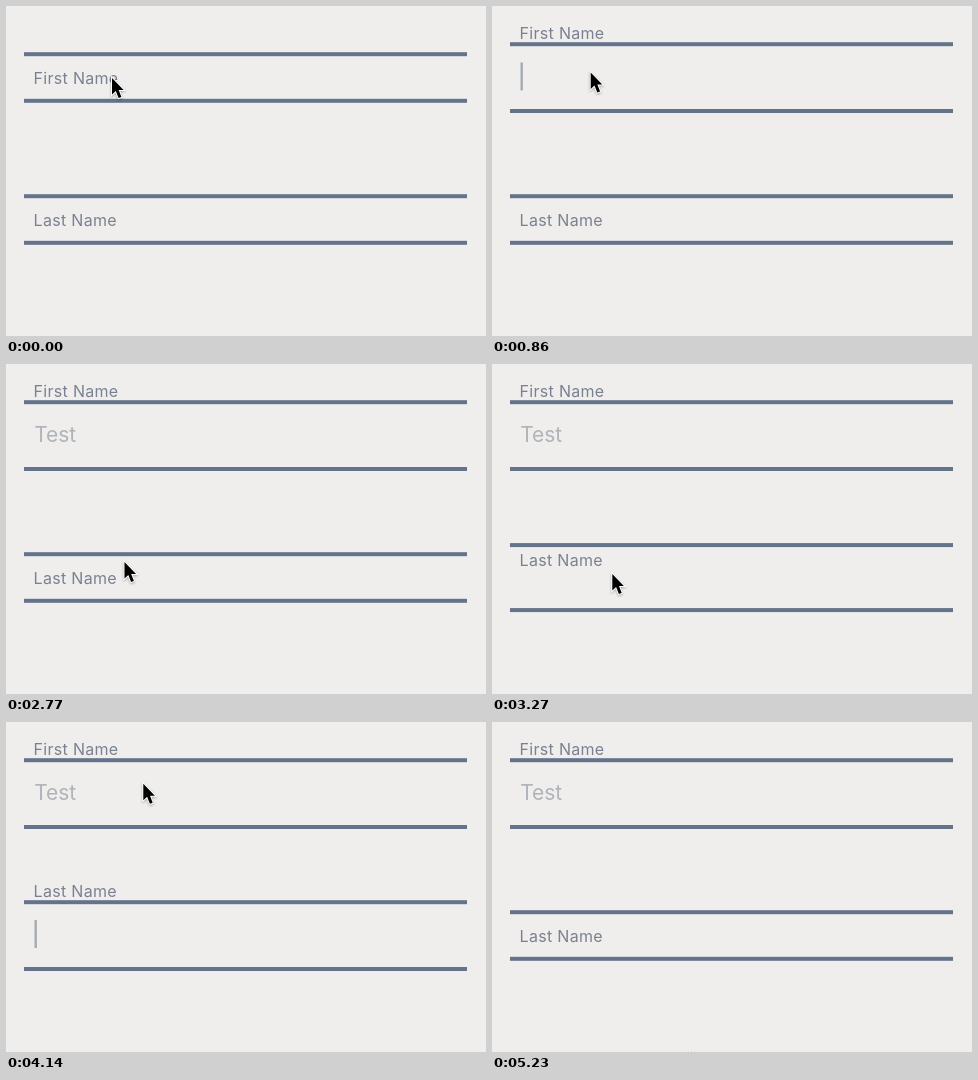
An HTML page that plays this animation: 480 px wide and 330 px high, repeating every 5460 ms.

```html
<!DOCTYPE html>
<html lang="en">
<head>
<meta charset="utf-8">
<title>Floating labels</title>
<style>
  html, body { margin: 0; width: 100%; height: 100%; overflow: hidden; background: #efeeed; }
  svg { display: block; width: 480px; height: 330px; font-family: Inter, sans-serif; }
  .bar { fill: #64738a; }
  .label { fill: #7a8190; font-size: 16px; letter-spacing: .3px; }
  .value { fill: #b0b4ba; font-size: 21px; letter-spacing: -.1px; }
  .caret { fill: #a6abb3; }
  #pointer { filter: drop-shadow(0 1.5px 1px rgba(0, 0, 0, .3)); }
</style>
</head>
<body>
<svg viewBox="0 0 480 330">
  <g id="first">
    <rect class="bar top" x="18" width="443" height="4"/>
    <rect class="bar bottom" x="18" width="443" height="4"/>
    <text class="label" x="27.6">First Name</text>
    <text class="value" x="28.3" y="78.3"></text>
    <rect class="caret" y="56.5" width="2.4" height="28"/>
  </g>
  <g id="last" transform="translate(0 142)">
    <rect class="bar top" x="18" width="443" height="4"/>
    <rect class="bar bottom" x="18" width="443" height="4"/>
    <text class="label" x="27.6">Last Name</text>
    <rect class="caret" y="56" width="2.4" height="28"/>
  </g>
  <path id="pointer" d="M0 0V16.5L3.8 13 6.6 20 9.4 19 6.7 12H11.6Z"
        stroke="#fff" stroke-width="2" paint-order="stroke"/>
</svg>
<script>
const LOOP = 5460, LABEL_MS = 400, BAR_MS = 150;
const TYPED = [1320, 1550, 1770, 2000];
const CARET_X = [28.5, 40.4, 51.7, 62.6, 69.4];

// start, end, from, to, easing power (0 = smooth in and out)
const MOVES = [
  [50, 480, [106, 72], [98.7, 66.5], 0],
  [2360, 2860, [98.7, 66.5], [120.3, 210], 0],
  [3610, 4140, [120.3, 210], [137.3, 61.8], 0],
  [4880, 5230, [137.3, 61.8], [198, 329.5], 1.5],
];

const $ = s => document.querySelector(s);
const clamp = x => Math.min(1, Math.max(0, x));
const mix = (a, b, k) => a + (b - a) * k;
const smooth = x => x * x * (3 - 2 * x);
const within = (t, a, b) => t >= a && t < b;

// cubic-bezier(.25, .1, .25, 1)
function ease(x) {
  let lo = 0, hi = 1;
  for (let i = 0; i < 20; i++) {
    const u = (lo + hi) / 2;
    if (.75 * u * (1 - u) + u ** 3 < x) lo = u; else hi = u;
  }
  return .3 * lo * (1 - lo) ** 2 + 3 * lo * lo * (1 - lo) + lo ** 3;
}

function drawField(id, t, opens, closes, caretX, caretOn) {
  const part = name => $(`#${id} .${name}`);
  const open = ms => ease(clamp((t - opens) / ms)) - ease(clamp((t - closes) / ms));
  const bars = open(BAR_MS);
  part('top').setAttribute('y', mix(46.2, 36.2, bars));
  part('bottom').setAttribute('y', mix(92.8, 103, bars));
  part('label').setAttribute('y', mix(77.6, 32.6, open(LABEL_MS)));
  part('caret').setAttribute('x', caretX);
  part('caret').style.opacity = caretOn ? 1 : 0;
}

function draw(t) {
  const typed = TYPED.filter(at => t >= at).length;
  $('.value').textContent = 'Test'.slice(0, typed);
  drawField('first', t, 480, Infinity, CARET_X[typed],
    within(t, 680, 2500) || within(t, 4440, 4940));
  drawField('last', t, 3175, 4440, CARET_X[0],
    within(t, 3380, 3670) || within(t, 4120, 4440));

  const [start, end, from, to, power] = MOVES.findLast(m => t >= m[0]) || MOVES[0];
  const x = clamp((t - start) / (end - start));
  const k = power ? x ** power : smooth(x);
  $('#pointer').setAttribute('transform',
    `translate(${mix(from[0], to[0], k)} ${mix(from[1], to[1], k)})`);
}

function frame(now) {
  draw(now % LOOP);
  requestAnimationFrame(frame);
}
draw(0);
requestAnimationFrame(frame);
</script>
</body>
</html>
```
